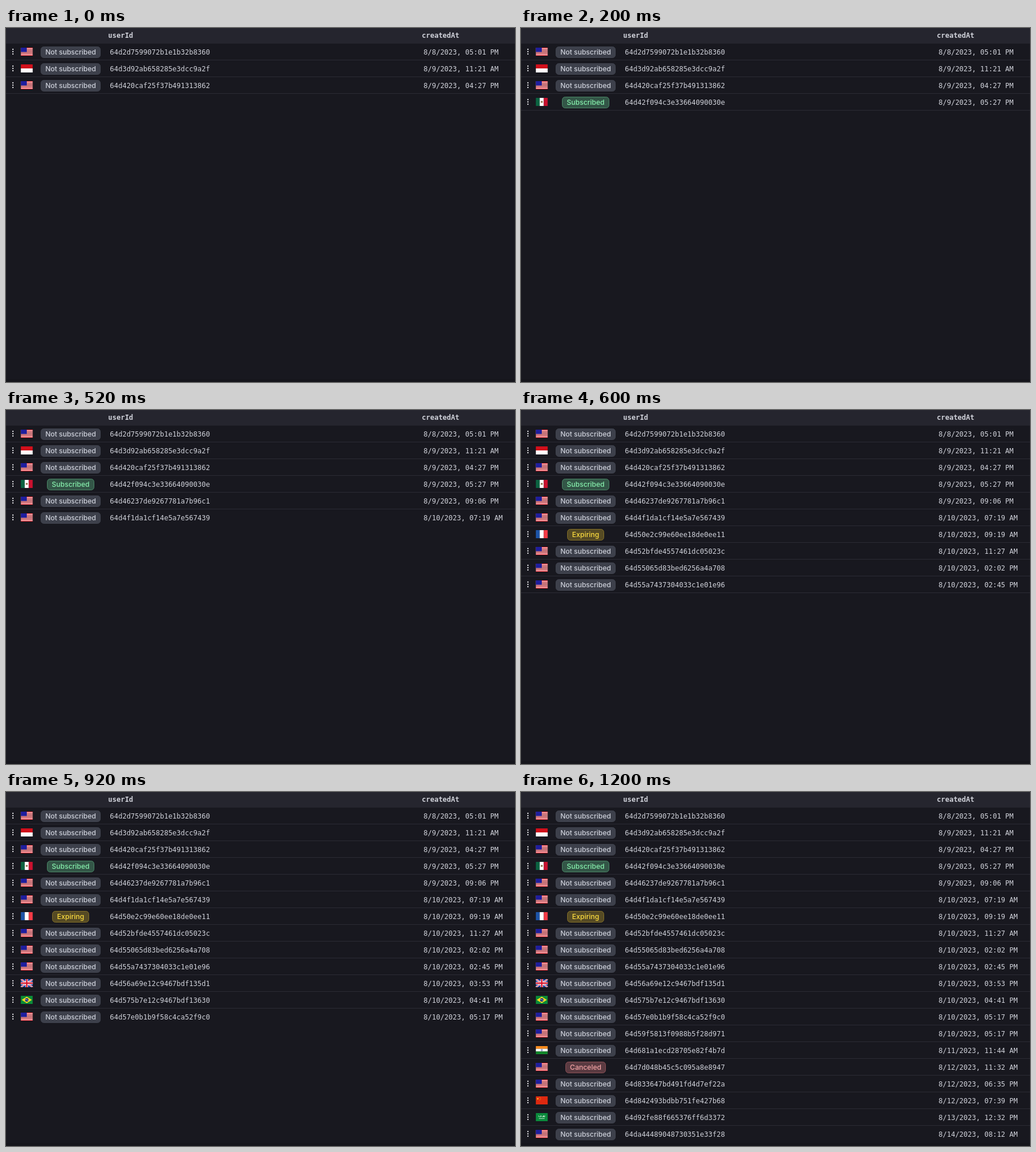
Animation, 882 px wide and 613 px high, one loop 1400 ms. Source, as an HTML page:

```html
<!DOCTYPE html>
<html lang="en">
<head>
<meta charset="utf-8">
<title>Subscriber table</title>
<style>
  html, body { margin: 0; width: 100%; height: 100%; overflow: hidden; background: #18181f; }
  svg { display: block; width: 882px; height: 613px; }
  .mono { font: 12px "DejaVu Sans Mono", monospace; fill: #d0d2da; white-space: pre; }
  .head { font-weight: 700; }
  .badge { font: 500 12px Inter, sans-serif; text-anchor: middle; }
</style>
</head>
<body>
<svg id="stage" viewBox="0 0 882 613">
  <defs>
    <clipPath id="flagBox"><rect width="21" height="14" rx=".5"/></clipPath>
  </defs>
  <rect width="882" height="613" fill="#18181f"/>
  <rect y="608" width="882" height="5" fill="#16161c"/>
  <path d="M0 27V2Q0 0 2 0H882V27Z" fill="#25252e"/>
  <text class="mono head" x="177" y="17">userId</text>
  <text class="mono head" x="720.5" y="17">createdAt</text>
</svg>
<script>
const LOOP = 1400, STEP = 200, ROW = 29;
const stage = document.getElementById('stage');

// step, flag, status, id, date
const rows = `
0 us n 64d2d7599072b1e1b32b8360 8/8/2023, 05:01 PM
0 id n 64d3d92ab658285e3dcc9a2f 8/9/2023, 11:21 AM
0 us n 64d420caf25f37b491313862 8/9/2023, 04:27 PM
1 mx s 64d42f094c3e33664090030e 8/9/2023, 05:27 PM
2 us n 64d46237de9267781a7b96c1 8/9/2023, 09:06 PM
2 us n 64d4f1da1cf14e5a7e567439 8/10/2023, 07:19 AM
3 fr e 64d50e2c99e60ee18de0ee11 8/10/2023, 09:19 AM
3 us n 64d52bfde4557461dc05023c 8/10/2023, 11:27 AM
3 us n 64d55065d83bed6256a4a708 8/10/2023, 02:02 PM
3 us n 64d55a7437304033c1e01e96 8/10/2023, 02:45 PM
4 gb n 64d56a69e12c9467bdf135d1 8/10/2023, 03:53 PM
4 br n 64d575b7e12c9467bdf13630 8/10/2023, 04:41 PM
4 us n 64d57e0b1b9f58c4ca52f9c0 8/10/2023, 05:17 PM
5 us n 64d59f5813f0988b5f28d971 8/10/2023, 05:17 PM
5 in n 64d681a1ecd28705e82f4b7d 8/11/2023, 11:44 AM
5 us c 64d7d048b45c5c095a8e8947 8/12/2023, 11:32 AM
6 us n 64d833647bd491fd4d7ef22a 8/12/2023, 06:35 PM
6 cn n 64d842493bdbb751fe427b68 8/12/2023, 07:39 PM
6 sa n 64d92fe88f665376ff6d3372 8/13/2023, 12:32 PM
6 us n 64da44489048730351e33f28 8/14/2023, 08:12 AM`
  .trim().split('\n').map(line => {
    const [step, flag, status, id, ...date] = line.split(' ');
    return { step: +step, flag, status, id, date: date.join(' ') };
  });

const badges = {
  n: { label: 'Not subscribed', w: 104, fill: '#3d404b', edge: '#3f424d', ink: '#cdd0da' },
  s: { label: 'Subscribed', w: 82, fill: '#335647', edge: '#4b8767', ink: '#86efac' },
  e: { label: 'Expiring', w: 64, fill: '#554a24', edge: '#857027', ink: '#fbdc3f' },
  c: { label: 'Canceled', w: 70, fill: '#5a3a41', edge: '#8c5156', ink: '#f2a3a5' }
};

const box = (x, y, w, h, fill) =>
  `<rect x="${x}" y="${y}" width="${w}" height="${h}" fill="${fill}"/>`;
const bands = (...colors) =>
  colors.map((c, i) => box(0, i * 14 / colors.length, 21, 14 / colors.length + .02, c)).join('');
const pales = (...colors) => colors.map((c, i) => box(i * 7, 0, 7, 14, c)).join('');
const stroke = (d, color, width) =>
  `<path d="${d}" stroke="${color}" stroke-width="${width}" fill="none"/>`;
const dot = (x, y, r, fill) => `<circle cx="${x}" cy="${y}" r="${r}" fill="${fill}"/>`;

function usFlag() {
  const stripes = Array.from({ length: 13 }, (_, i) => i % 2 ? '#fff' : '#f5202a');
  let stars = '';
  for (let i = 0; i < 15; i++) stars += dot(1.2 + i % 5 * 2, 1.3 + Math.floor(i / 5) * 2.4, .25, '#6c6cc8');
  return bands(...stripes) + box(0, 0, 10.5, 7.54, '#1b1b9c') + stars;
}

const saltire = 'M0 0L21 14M21 0L0 14', cross = 'M10.5 0V14M0 7H21';
const flags = {
  us: usFlag(),
  id: bands('#d00f1b', '#fff'),
  mx: pales('#0b6341', '#fff', '#c8102e') + dot(10.5, 7, 1.8, '#9a7a4c') + dot(10.7, 6.6, .8, '#5b4a2a'),
  fr: pales('#1d54a8', '#fff', '#f33a45'),
  gb: box(0, 0, 21, 14, '#12359a') + stroke(saltire, '#fff', 2.7) + stroke(saltire, '#d8152c', 1) +
      stroke(cross, '#fff', 4.4) + stroke(cross, '#d8152c', 2.5),
  br: box(0, 0, 21, 14, '#0b8b38') + '<path d="M10.5 1.5L19.3 7L10.5 12.5L1.7 7Z" fill="#fcd920"/>' +
      dot(10.5, 7, 3.1, '#1c3382') + stroke('M7.6 6.4Q10.8 5.9 13.3 8.3', '#fff', .6),
  in: bands('#f98b1d', '#fff', '#12882b') +
      '<circle cx="10.5" cy="7" r="1.5" fill="#b9bbdc" stroke="#4c4f9c" stroke-width=".5"/>',
  cn: box(0, 0, 21, 14, '#de2910') +
      '<path d="M3.6 1.9L4.1 3.4H5.7L4.4 4.4L4.9 5.9L3.6 5L2.3 5.9L2.8 4.4L1.5 3.4H3.1Z" fill="#ffd21c"/>' +
      [[7, 1.5], [8.4, 2.9], [8.4, 5], [7, 6.4]].map(([x, y]) => dot(x, y, .5, '#f5a918')).join(''),
  sa: box(0, 0, 21, 14, '#0b8b3c') +
      stroke('M5.2 6.6V4.3M6.4 6.5H8.4V4.2M9.3 4.4L10.4 6.6M11.2 6.5H13V4.3M14 4.4V6.6H15.6V4', '#d5ecdc', .9) +
      stroke('M5.6 9.4H15.4', '#e4f3e8', .8)
};

function badge(key) {
  const { label, w, fill, edge, ink } = badges[key];
  return `<rect x="${112.5 - w / 2}" y="32.5" width="${w - 1}" height="19" rx="5" fill="${fill}" stroke="${edge}"/>
    <text class="badge" x="112" y="46" fill="${ink}">${label}</text>`;
}

function add(html, y) {
  const g = document.createElementNS('http://www.w3.org/2000/svg', 'g');
  g.setAttribute('transform', `translate(0 ${y})`);
  g.innerHTML = html;
  stage.append(g);
  return g;
}

function showFrom(el, step) {
  if (!step) return;
  el.animate([
    { opacity: 0, offset: 0, easing: 'step-end' },
    { opacity: 1, offset: step * STEP / LOOP },
    { opacity: 1, offset: 1 }
  ], { duration: LOOP, iterations: Infinity });
}

// Some batches end without a rule; it arrives with the next batch.
const lateRules = [2, 4, 6];

rows.forEach((row, i) => {
  const y = i * ROW;
  const dots = [37, 41, 45].map(cy => dot(12, cy, 1.15, '#e6e6ea')).join('');
  const content = add(`${dots}
    <g transform="translate(25.5 34)" clip-path="url(#flagBox)">${flags[row.flag]}</g>
    ${badge(row.status)}
    <text class="mono" x="180" y="46">${row.id}</text>
    <text class="mono" x="723.5" y="46">${row.date}</text>`, y);
  showFrom(content, row.step);

  const next = rows[i + 1];
  const endsBatch = !next || next.step > row.step;
  const late = endsBatch && lateRules.includes(row.step);
  if (late && !next) return;
  showFrom(add(box(0, 55, 882, 1, '#2b2b34'), y), row.step + (late ? 1 : 0));
});
</script>
</body>
</html>
```
